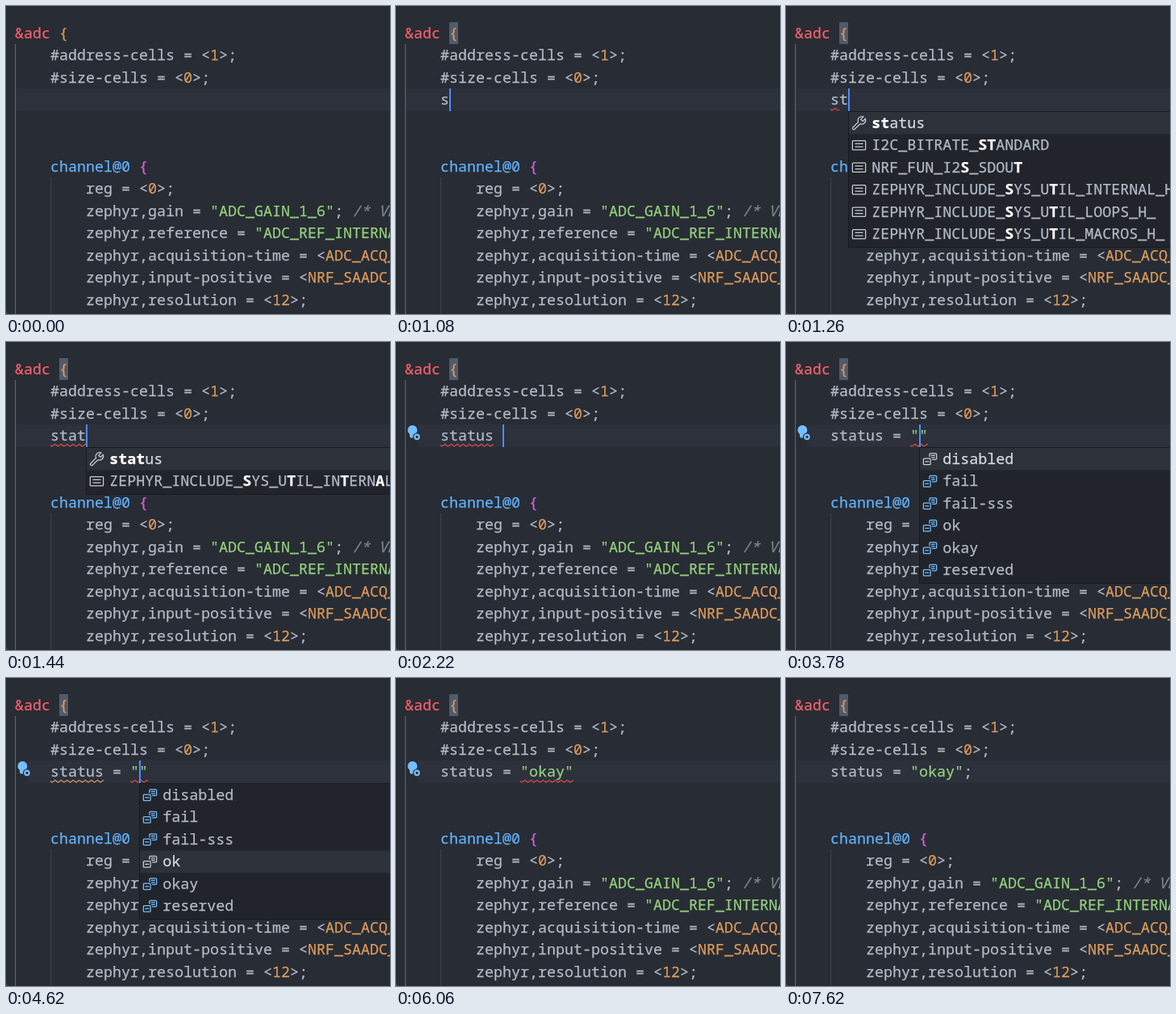
Write an HTML page that moves like this. It is 476 px wide and 381 px high and loops after 7.68 s.

```html
<!DOCTYPE html>
<html lang="en">
<head>
<meta charset="utf-8">
<title>Editor completion</title>
<style>
  html, body { margin: 0; width: 100%; height: 100%; overflow: hidden; background: #282c34; }
  svg { display: block; }
  text { font: 500 18.33px "Noto Sans Mono", "DejaVu Sans Mono", monospace; white-space: pre; stroke-width: .25; }
</style>
</head>
<body>
<svg id="stage" width="476" height="381" viewBox="0 0 476 381">
  <rect width="476" height="381" fill="#282c34"/>
  <path d="M0 376a5 5 0 0 0 5 5H0z" fill="#43484f"/>
  <rect x="11" y="102" width="465" height="28" fill="#2c313c"/>
  <g id="back"></g>
  <g id="code"></g>
  <g id="live"></g>
</svg>
<script>
const LOOP = 7680, CH = 11, ROW = 27.5, LEFT = 11, EDIT_X = 55;
const C = {
  fg: "#b3bac7", red: "#f55f6c", orange: "#dc9a5c", green: "#93d07c", blue: "#61b1fa",
  purple: "#d861e0", note: "#7f848e", err: "#e04b43", icon: "#75beff", bright: "#d7dae0"
};
const el = id => document.getElementById(id);
const esc = s => s.replace(/&/g, "&amp;").replace(/</g, "&lt;");
const rect = (x, y, w, h, fill, more = "") =>
  `<rect x="${x}" y="${y}" width="${w}" height="${h}" fill="${fill}" ${more}/>`;
const ink = color => `fill="${color}" stroke="${color}"`;
const span = ([kind, s]) =>
  `<tspan ${ink(C[kind])}${kind === "note" ? ' font-style="italic"' : ""}>${esc(s)}</tspan>`;
const line = (row, col, runs) =>
  `<text x="${LEFT + col * CH}" y="${Math.floor(40 + row * ROW)}">${runs.map(span).join("")}</text>`;

// Static document
const prop = (name, ...value) => [["fg", name + " = "], ...value];
const cell = (name, value) => prop(name, ["fg", "<"], ["orange", value], ["fg", ">;"]);
el("code").innerHTML =
  rect(11, 47, 1.25, 334, "#5d6168") + rect(55, 212, 1.25, 169, "#3b4048") +
  line(0, 0, [["red", "&adc "], ["orange", "{"]]) +
  line(1, 4, cell("#address-cells", "1")) +
  line(2, 4, cell("#size-cells", "0")) +
  line(6, 4, [["blue", "channel@0 "], ["purple", "{"]]) +
  [
    cell("reg", "0"),
    prop("zephyr,gain", ["green", '"ADC_GAIN_1_6"'], ["fg", "; "], ["note", "/* VDD"]),
    prop("zephyr,reference", ["green", '"ADC_REF_INTERNAL"'], ["fg", ";"]),
    cell("zephyr,acquisition-time", "ADC_ACQ_TIME"),
    cell("zephyr,input-positive", "NRF_SAADC_AIN0"),
    cell("zephyr,resolution", "12")
  ].map((runs, i) => line(7 + i, 8, runs)).join("");

// Icons on a 16 unit grid
const icons = {
  prop: `<path d="M2 14.1a1.2 1.2 0 0 1-.1-1.7L7.3 6.9A3.8 3.8 0 0 1 12.3 1.9L9.8 4.4l1.9 1.9 2.5-2.5
    A3.8 3.8 0 0 1 9.2 8.8L3.6 14.2a1.2 1.2 0 0 1-1.6-.1z"/>`,
  macro: `<rect x="1.5" y="3.5" width="13" height="9" rx=".7"/><path d="M4 6.5h8M4 9.5h8"/>`,
  member: `<path d="M7.5 6V3.2l.7-.7h5.6l.7.7v4.6l-.7.7H10M9 4.5h4M9.2 6.5H13M3 10.5h4"/>
    <rect x="1.5" y="7.5" width="7" height="6" rx=".7"/>`
};
const icon = (kind, x, y, color) =>
  `<g transform="translate(${x} ${y}) scale(1.25)" fill="none" stroke="${color}">${icons[kind]}</g>`;

const bulb =
  rect(12.5, 102, 14.5, 28, "#282c34") +
  `<path d="M17 117v-3a6 6 0 1 1 6.8 0v3l-1.2 1.6h-4.4z" fill="${C.icon}"/>
   <circle cx="26" cy="117.4" r="5" fill="#282c34"/>
   <circle cx="26" cy="117.4" r="2.7" fill="none" stroke="${C.icon}" stroke-width="2.2"/>`;

// Asterisks toggle the bold matched letters
function popup({ kind, rows, sel = 0 }, col) {
  const x = EDIT_X + col * CH, height = rows.length * ROW + 3;
  let out = rect(x + .5, 130.5, 540, height, "#21252b", 'stroke="#181a1f"');
  rows.forEach((row, i) => {
    const y = 131 + i * ROW, on = i === sel;
    const type = kind || (/^[A-Z]/.test(row) ? "macro" : "prop");
    if (on) out += rect(x + 1, y, 538, ROW, "#2c313a");
    out += icon(type, x + 3.5, y + 3.7, type === "member" && !on ? C.icon : "#c8ccd4");
    const parts = row.split("*").map((s, k) =>
      k % 2 ? `<tspan font-weight="700" ${ink("#fff")}>${s}</tspan>` : s);
    out += `<text x="${x + 29.3}" y="${Math.floor(y + 20)}" ${ink(on ? C.bright : C.fg)}>${parts.join("")}</text>`;
  });
  return out;
}

const sysUtil = end => "ZEPHYR_INCLUDE_*S*YS_U*T*IL_" + end;
const lists = {
  s: { rows: ["*s*tatus", "#*s*ize-cells", "#addre*s*s-cells", "interrupt*s*", "clock*s*", "dma*s*",
    "I2C_BITRATE_*S*TANDARD", "NRF_FUN_I2*S*_SDOUT", "ZEPHYR_INCLUDE_*S*YS_UTIL_H_",
    "NRF_FUN_*S*PIM_SCK", "NRF_FUN_*S*PIM_MOSI", "NRF_FUN_*S*PIM_MISO"] },
  st: { rows: ["*st*atus", "I2C_BITRATE_*ST*ANDARD", "NRF_FUN_I2*S*_SDOU*T*",
    sysUtil("INTERNAL_H_"), sysUtil("LOOPS_H_"), sysUtil("MACROS_H_")] },
  sta: { rows: ["*sta*tus", "I2C_BITRATE_*STA*NDARD", sysUtil("INTERN*A*L_H_")] },
  stat: { rows: ["*stat*us", sysUtil("IN*T*ERN*A*L_H_")] },
  statu: { rows: ["*statu*s"] },
  status: { rows: ["*status*"] }
};
const values = sel => ({ kind: "member", sel,
  rows: ["disabled", "fail", "fail-sss", "ok", "okay", "reserved"] });

// [time, changes]; cur, err and warn are columns of the edited line
const steps = [
  [0, { text: "", cur: 0, on: 0, match: 0, bulb: 0, err: null, warn: null, list: null }],
  [360, { on: 1 }],
  [420, { match: 1 }],
  [900, { on: 0 }],
  [1080, { text: "s", cur: 1, on: 1 }],
  [1140, { list: lists.s, err: [0, 1] }],
  [1260, { text: "st", cur: 2, list: lists.st }],
  [1320, { text: "sta", cur: 3, list: lists.sta }],
  [1380, { err: [0, 3] }],
  [1440, { text: "stat", cur: 4, list: lists.stat, err: [0, 4] }],
  [1620, { text: "statu", cur: 5, list: lists.statu, err: [0, 5] }],
  [1740, { text: "status", cur: 6, list: lists.status, err: [0, 6] }],
  [1980, { bulb: 1 }],
  [2220, { text: "status ", cur: 7, list: null }],
  [2340, { text: "status =", cur: 8 }],
  [2400, { text: "status = ", cur: 9 }],
  [2460, { err: [7, 8] }],
  [2640, { bulb: 0 }],
  [2880, { on: 0 }],
  [3360, { text: 'status = ""', cur: 10, on: 1 }],
  [3420, { list: values(0) }],
  [3540, { err: [9, 11] }],
  [3780, { bulb: 1 }],
  [3960, { on: 0 }],
  [4260, { list: values(1) }],
  [4440, { list: values(2), on: 1 }],
  [4500, { warn: [0, 6] }],
  [4620, { list: values(3) }],
  [4740, { list: values(4) }],
  [4920, { on: 0 }],
  [5100, { text: 'status = "okay"', cur: 14, on: 1, list: null, warn: null, err: [9, 15] }],
  [5520, { cur: 15 }],
  [6060, { on: 0 }],
  [6240, { text: 'status = "okay";', cur: 16, on: 1 }],
  [6300, { err: null }],
  [6480, { bulb: 0 }],
  [6720, { on: 0 }],
  [7200, { on: 1 }],
  [7620, { on: 0 }]
];

// Triangle wave below the columns of a range
function squiggle(range, color) {
  if (!range) return "";
  const [from, to] = range.map(col => col * CH);
  const points = [];
  for (let x = from; x <= to; x += .5) {
    const phase = ((x - from + 5.4) % 7.5) / 3.75;
    points.push(`${EDIT_X + x},${126.4 + 2.7 * Math.abs(phase - 1)}`);
  }
  return `<polyline points="${points.join(" ")}" fill="none" stroke="${color}" stroke-width="1.2"/>`;
}

function render(s) {
  const runs = s.text.split(/("[^"]*")/).map(p => [p[0] === '"' ? "green" : "fg", p]);
  el("back").innerHTML = s.match ? rect(66, 20, 11, 27, "#515a6b") : "";
  el("live").innerHTML =
    (s.bulb ? bulb : "") +
    line(3, 4, runs) +
    squiggle(s.warn, C.orange) + squiggle(s.err, C.err) +
    (s.list ? popup(s.list, s.cur) : "") +
    (s.on ? rect(EDIT_X + s.cur * CH, 102, 2, 28, "#528bff") : "");
}

let shown = -1;
function draw(now) {
  const t = now % LOOP;
  const past = steps.filter(([at]) => at <= t);
  if (past.length !== shown) {
    shown = past.length;
    render(Object.assign({}, ...past.map(([, change]) => change)));
  }
}

const start = performance.now();
function tick() {
  draw(performance.now() - start);
  requestAnimationFrame(tick);
}
tick();
</script>
</body>
</html>
```
